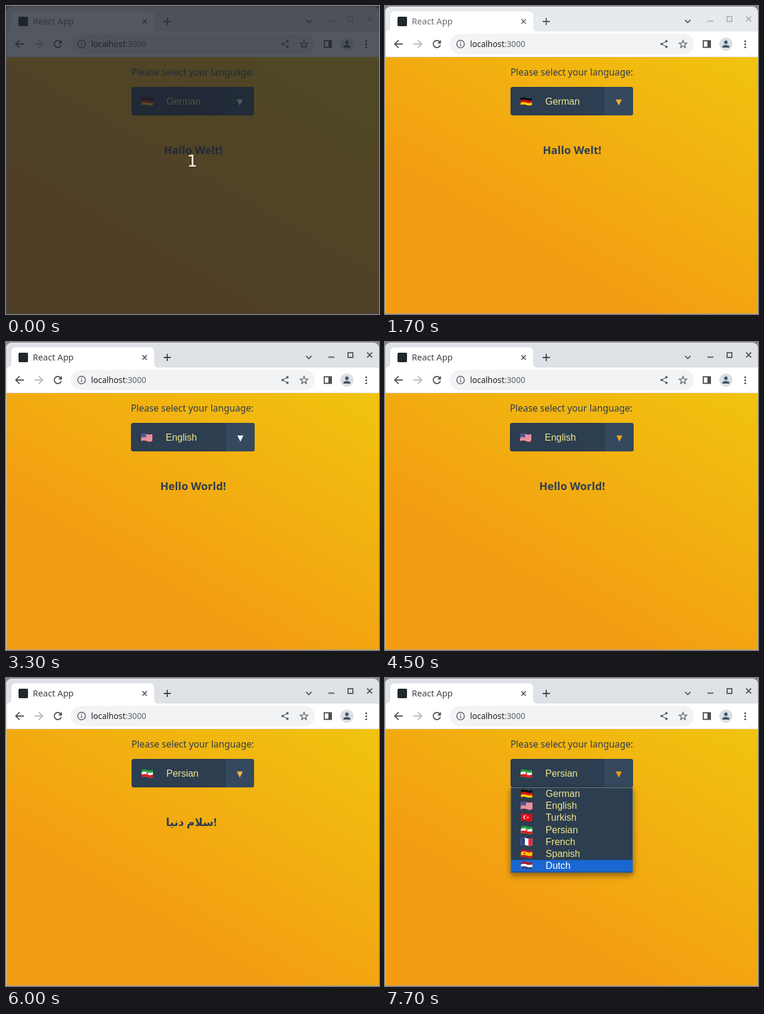
An HTML page with a canvas for the animation above (8 s loop, 627 by 518 pixels).

```html
<!DOCTYPE html>
<html lang="en">
<head>
<meta charset="utf-8">
<title>Language selector</title>
<style>
  html, body { margin: 0; width: 100%; height: 100%; overflow: hidden; }
  canvas { display: block; width: 627px; height: 518px; }
</style>
</head>
<body>
<canvas id="stage" width="627" height="518"></canvas>
<script>
const ctx = document.getElementById('stage').getContext('2d');
const W = 627, H = 518, LOOP = 8000, FOCUS_AT = 2200;
const UI = '"Noto Sans", "DejaVu Sans", sans-serif';
const FORM = '"Liberation Sans", Arial, sans-serif';
const NAVY = '#2c3e50', KHAKI = '#f0e68c', ICON = '#5f6368';

// start time, selected language, highlighted row (-1: list closed)
const STATES = [
  [0, 0, -1], [2200, 0, 0], [2600, 0, 1], [3000, 1, -1],
  [5100, 1, 1], [5200, 1, 0], [5300, 1, 2], [5400, 1, 3], [6000, 3, -1],
  [7100, 3, 3], [7300, 3, 0], [7400, 3, 3], [7500, 3, 5], [7700, 3, 6]
];
// pointer enters (1) or leaves (0) the select
const HOVERS = [[1580, 1], [3000, 0], [4350, 1], [5980, 0], [6750, 1]];
const LANGS = ['German', 'English', 'Turkish', 'Persian', 'French', 'Spanish', 'Dutch'];
const GREETINGS = { 0: 'Hallo Welt!', 1: 'Hello World!', 3: 'سلام دنیا!' };

function rect(x, y, w, h, color) {
  ctx.fillStyle = color;
  ctx.fillRect(x, y, w, h);
}

function round(x, y, w, h, r, color) {
  ctx.fillStyle = color;
  ctx.beginPath();
  ctx.roundRect(x, y, w, h, r);
  ctx.fill();
}

function dot(x, y, r, color) {
  ctx.fillStyle = color;
  ctx.beginPath();
  ctx.arc(x, y, r, 0, 7);
  ctx.fill();
}

function text(str, x, y, font, color, align = 'left') {
  ctx.font = font;
  ctx.fillStyle = color;
  ctx.textAlign = align;
  ctx.fillText(str, x, y);
}

function stroke(path, color, width = 1.6) {
  ctx.strokeStyle = color;
  ctx.lineWidth = width;
  ctx.stroke(new Path2D(path));
}

function shape(path, color) {
  ctx.fillStyle = color;
  ctx.fill(new Path2D(path));
}

// Flags: 19 x 12 with a gentle wave
const FLAG_W = 19, FLAG_H = 12;
const wave = x => -0.9 * Math.sin(x / FLAG_W * Math.PI * 2);

function band(x0, x1, y0, y1, color) {
  ctx.fillStyle = color;
  ctx.beginPath();
  for (let x = x0; x <= x1; x += 0.5) ctx.lineTo(x, y0 + wave(x));
  for (let x = x1; x >= x0; x -= 0.5) ctx.lineTo(x, y1 + wave(x));
  ctx.fill();
}

function stripes(colors, sizes = colors.map(() => 1)) {
  const total = sizes.reduce((a, b) => a + b);
  let y = 0;
  colors.forEach((color, i) => {
    band(0, FLAG_W, y, FLAG_H, color);
    y += FLAG_H * sizes[i] / total;
  });
}

const FLAGS = [
  () => stripes(['#111111', '#dd1010', '#ffce00']),
  () => {
    stripes(Array.from({ length: 13 }, (_, i) => i % 2 ? '#ffffff' : '#cc2236'));
    band(0, 8.5, 0, 6.5, '#3c4a86');
    ctx.globalAlpha = 0.6;
    for (let i = 0; i < 12; i++) {
      const x = 1.2 + i % 4 * 2;
      dot(x, 1.3 + Math.floor(i / 4) * 2 + wave(x), 0.45, '#fff');
    }
    ctx.globalAlpha = 1;
  },
  () => {
    stripes(['#e30a17']);
    dot(7.2, 5.6, 3.2, '#fff');
    dot(8.1, 5.7, 2.5, '#e30a17');
    dot(11.6, 6.3, 1.3, '#fff');
  },
  () => {
    stripes(['#239f40', '#f4f4f4', '#da1a1a']);
    dot(9.5, 6, 1.5, '#da1a1a');
  },
  () => {
    stripes(['#ffffff']);
    band(0, 6.5, 0, FLAG_H, '#22408f');
    band(12.5, FLAG_W, 0, FLAG_H, '#ee2436');
  },
  () => {
    stripes(['#c8102a', '#ffc400', '#c8102a'], [1, 2, 1]);
    dot(6, 5.4, 1.7, '#b3502a');
  },
  () => stripes(['#b01c2c', '#ffffff', '#21468b'])
];

function option(lang, x, mid, color) {
  ctx.save();
  ctx.translate(x + 17, mid - FLAG_H / 2);
  FLAGS[lang]();
  ctx.restore();
  text(LANGS[lang], x + 58.5, mid + 5.5, '16px ' + FORM, color);
}

function drawTabs(focused) {
  const strip = focused ? '#dee1e6' : '#e7eaed';
  const title = focused ? '#3c4043' : '#696c70';
  const control = focused ? '#5a5d61' : '#b4b7ba';
  rect(0, 0, W, H, '#85878a');
  round(0, 1, W, 60, [9, 9, 0, 0], strip);
  shape('M1 43Q9 43 9 35V17Q9 9 17 9H241Q249 9 249 17V35Q249 43 257 43Z', '#fff');
  round(21, 18, 16, 16, 2, '#20282c');
  text('React App', 45, 31, '14.6px ' + UI, title);
  stroke('M229.3 22.3l7.4 7.4M236.7 22.3l-7.4 7.4', focused ? '#45484c' : ICON, 1.6);
  stroke('M265 26h12M271 20v12', focused ? '#3c4043' : '#505357', 1.8);
  stroke('M504.5 23.5l4.5 4.5l4.5 -4.5', '#55585c', 1.8);
  stroke('M542 25.5h10M575 18h8v8h-8zM607 17.5l8.5 8.5M615.5 17.5l-8.5 8.5', control, 2);
}

function drawToolbar() {
  rect(0, 43, W, 43, '#fff');
  rect(0, 85, W, 1, '#dfe1e3');
  const arrow = 'h-13M-6 -6l-6 6l6 6';
  for (const [x, color, flip] of [[23, '#505357', 1], [55, '#b9bbbe', -1]]) {
    ctx.save();
    ctx.translate(x, 64);
    ctx.scale(flip, 1);
    stroke('M7 0h-13.5M-0.2 -6.4l-6.4 6.4l6.4 6.4', color, 1.9);
    ctx.restore();
  }
  stroke('M92.2 60.6A6 6 0 1 0 93 65.5', '#505357', 1.9);
  shape('M94 57v6.2h-6.2z', '#505357');

  round(109, 47, 410, 34, 17, '#f1f3f4');
  stroke('M120.6 64a6.4 6.4 0 1 0 12.8 0a6.4 6.4 0 1 0 -12.8 0M127 63v4.4M127 60v1.6', ICON, 1.5);
  const font = '13.7px ' + UI;
  text('localhost', 143, 69, font, '#202124');
  text(':3000', 143 + ctx.measureText('localhost').width, 69, font, ICON);

  stroke('M473 59.5l-8 4.5l8 4.5', ICON, 1.3);
  for (const [x, y] of [[473, 59.3], [465, 64], [473, 68.7]]) dot(x, y, 2.1, ICON);
  let star = '';
  for (let i = 0; i < 10; i++) {
    const r = i % 2 ? 2.9 : 6.8, a = (i / 5 - 0.5) * Math.PI;
    star += (i ? 'L' : 'M') + (501 + r * Math.cos(a)) + ' ' + (64.5 + r * Math.sin(a));
  }
  stroke(star + 'Z', ICON, 1.4);

  stroke('M535 58.5h12v11h-12z', '#4a4d51', 1.8);
  rect(542, 58, 5, 12, '#4a4d51');
  dot(573, 64, 11, '#dadfe4');
  dot(573, 61, 2.9, '#46566a');
  shape('M567 70v-1.5Q567.5 65.6 573 65.4Q578.500 65.6 579 68.5V70Z', '#46566a');
  for (const y of [59.3, 64.3, 69.3]) dot(605.5, y, 1.6, '#505357');
}

function drawPage() {
  // 30deg gradient line across the page box
  const top = 86, h = 431, a = Math.PI / 6;
  const half = (W * Math.sin(a) + h * Math.cos(a)) / 2;
  const dx = half * Math.sin(a), dy = half * Math.cos(a);
  const cx = W / 2, cy = top + h / 2;
  const fill = ctx.createLinearGradient(cx - dx, cy + dy, cx + dx, cy - dy);
  fill.addColorStop(0.3, '#f39c12');
  fill.addColorStop(1, '#f1c40f');
  rect(0, top, W, h, fill);
  rect(0, 10, 1, H - 10, '#c3c6ca');
  rect(0, 517, W, 1, '#a9a6a0');
}

function hoverLevel(t) {
  let level = 0;
  for (const [start, target] of HOVERS) {
    if (t < start) break;
    const p = Math.min(1, (t - start) / 250);
    level += (target - level) * (1 - (1 - p) ** 3);
  }
  return level;
}

function caretColor(k) {
  const mix = to => Math.round(255 + (to - 255) * k);
  return `rgb(${mix(243)},${mix(156)},${mix(18)})`;
}

function drawSelect(lang, x, w, level) {
  round(x, 136, w, 48, 4, NAVY);
  round(x + w - 48, 136, 48, 48, [0, 4, 4, 0], '#34495e');
  const mid = x + w - 24;
  shape(`M${mid - 5} 157.300h10l-5 10.200z`, caretColor(level));
  option(lang, x, 160.5, KHAKI);
}

function drawList(active, x, w) {
  ctx.save();
  ctx.shadowColor = 'rgba(0,0,0,.42)';
  ctx.shadowBlur = 10;
  ctx.shadowOffsetY = 4;
  rect(x, 184, w, 144, '#767676');
  ctx.restore();
  rect(x + 1, 185, w - 2, 142, NAVY);
  const rowTop = i => Math.round(185 + 20.2 * i);
  LANGS.forEach((_, i) => {
    const y = rowTop(i), on = i === active;
    if (on) rect(x + 1, y, w - 2, 20, '#1967d2');
    option(i, x + 0.6, y + 9.5, on ? '#fff' : KHAKI);
  });
}

function draw(time) {
  const t = Math.floor(time % LOOP / 100) * 100;
  const [, lang, active] = STATES.filter(s => s[0] <= t).pop();
  const wide = lang === 1;
  const x = wide ? 210 : 211, w = wide ? 208 : 206;

  drawTabs(t >= FOCUS_AT);
  drawToolbar();
  drawPage();
  text('Please select your language:', wide ? 313 : 314, 117, '15.45px ' + UI, NAVY, 'center');
  text(GREETINGS[lang], 314.5, 249, 'bold 18.2px ' + UI, NAVY, 'center');
  drawSelect(lang, x, w, hoverLevel(t));
  if (active >= 0) drawList(active, x, w);

  if (t < 100) {
    rect(0, 0, W, H, 'rgba(29,35,45,.76)');
    text('1', 313, 270, '27px "DejaVu Sans", sans-serif', '#fdf6e0', 'center');
  }
}

const start = performance.now();
function tick() {
  draw(performance.now() - start);
  requestAnimationFrame(tick);
}
tick();
</script>
</body>
</html>
```
